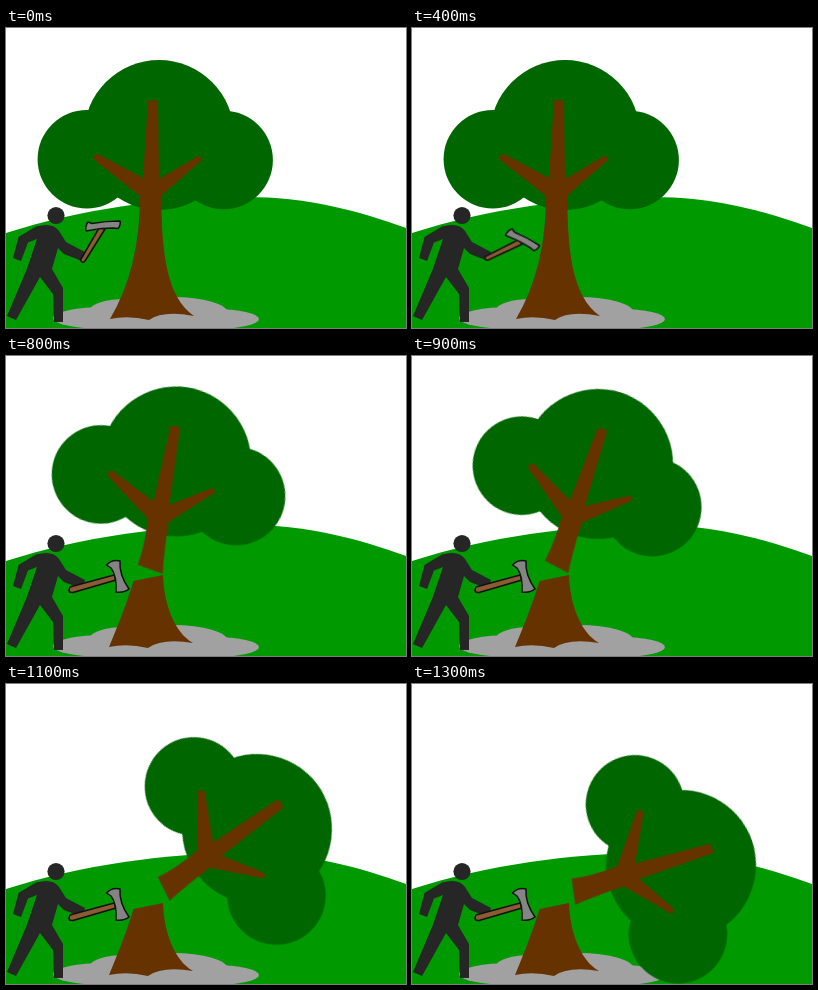
An HTML page without scripts that plays this animation: 400x300 px, repeating every 1700 ms.

```html
<!DOCTYPE html>
<html lang="en">
<head>
<meta charset="utf-8">
<title>Felling a tree</title>
<style>
html, body { margin: 0; width: 100%; height: 100%; overflow: hidden; background: #fff; }
svg { display: block; width: 100%; height: 100%; }

.wood { fill: #630; }
.leaf { fill: #060; }
.rock { fill: #a1a1a1; }
.man { fill: #262626; }
.axe { stroke: #111; stroke-width: 1.5; stroke-linejoin: round; }
.handle { fill: #8c5a33; }
.blade { fill: #848484; }

.crown, .swing, .before, .after { animation: 1.7s step-end infinite; }
.crown { animation-name: fall; }
.before { animation-name: before; }
.after { animation-name: after; }
.swing { transform-origin: 79.5px 228px; animation-name: swing; }

/* the axe turns 8.25deg every 100ms until the cut */
@keyframes swing {
  0% { transform: rotate(0); animation-timing-function: steps(6); }
  35.28%, 100% { transform: rotate(49.5deg); }
}
@keyframes before { 0% { visibility: visible; } 35.28%, 100% { visibility: hidden; } }
@keyframes after { 0% { visibility: hidden; } 35.28%, 100% { visibility: visible; } }
@keyframes fall {
  0% { transform: translate(153px, 107px); }
  35.28% { transform: translate(153px, 106px); }
  41.17% { transform: translate(153px, 106px) rotate(.4deg); }
  47.05% { transform: translate(170px, 105.5px) rotate(8.8deg); }
  52.93% { transform: translate(186px, 108px) rotate(17.3deg); }
  58.81% { transform: translate(222px, 124px) rotate(33deg); }
  64.7% { transform: translate(251px, 145px) rotate(52.6deg); }
  70.58% { transform: translate(263px, 168px) rotate(65deg); }
  76.46%, 100% { transform: translate(269px, 181px) rotate(71.4deg); }
}
</style>
</head>
<body>
<svg viewBox="0 0 400 300" preserveAspectRatio="none">
  <path fill="#090" d="M0 205C75 181 160 169 240 169C300 169 350 182 400 200V300H0Z"/>

  <g class="rock">
    <ellipse cx="100" cy="290" rx="53" ry="11"/>
    <ellipse cx="120" cy="282" rx="36" ry="11"/>
    <ellipse cx="167" cy="285" rx="55" ry="16"/>
    <ellipse cx="208" cy="291" rx="45" ry="10"/>
    <ellipse cx="155" cy="292" rx="82" ry="14"/>
  </g>

  <path class="wood after" d="M127.5 225L157 219C158 248 168 276 187 287Q156 282 142 292Q121 287 103 291Q120 250 127.500 225Z"/>

  <g class="crown">
    <g class="leaf">
      <circle r="75"/>
      <circle cx="-72.2" cy="24.2" r="49.200"/>
      <circle cx="64.700" cy="25" r="49.200"/>
    </g>
    <path class="wood" d="M-11-34Q-6-36-1-34L0 44L39 21Q43 21 43 25L2 61Q2 91 4 113L-22 108Q-18 89-19 61L-66 24Q-65 19-61 19L-16 43Z"/>
  </g>
  <path class="wood before" d="M134 168Q134 240 104 291Q122 287 143 292Q157 282 188 288C160 268 156 225 155 168Z"/>

  <g class="man">
    <circle cx="50" cy="187.500" r="8.600"/>
    <path d="M7 230L12.500 209L30 198.500Q47 194 53 203L60 214L79 224L76 233L58 226L52 220L46 241L57 260L57 294L48 294L47 266L34 249L10 292L1 288L20.500 242L31 211L22 214.500L15 233Z"/>
  </g>

  <g class="axe before">
    <g class="swing">
      <path class="handle" d="M74.500 232L93 200L99 201L79 233Q76 236 74.500 232Z"/>
      <path class="blade" d="M82 194L86 195.500Q100 193 114 193Q115 197 112 200.500L107 200Q95 200 86 202L80 203Q79 198 82 194Z"/>
    </g>
  </g>
  <g class="axe after">
    <path class="handle" d="M64 231L108 219L110 224L67 236.500Q61 237 64 231Z"/>
    <path class="blade" d="M100.500 209Q106 203 114 205Q113 219 123 233Q118 237 110 236Q111 220 105 212Z"/>
  </g>
</svg>
</body>
</html>
```
